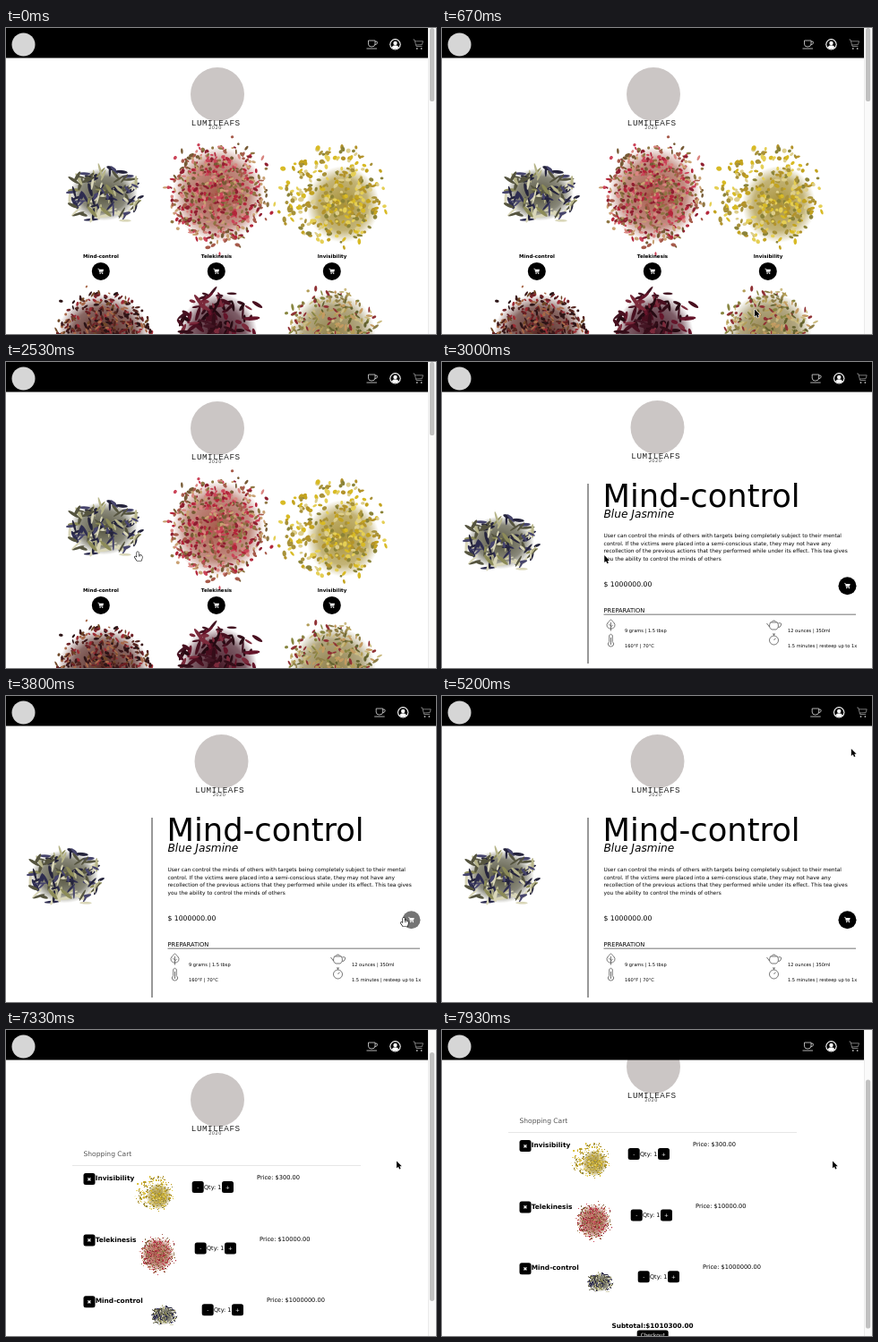
These frames come from a looping animation (480 px wide and 342 px high, 8 s). An HTML page with a canvas:

```html
<!DOCTYPE html>
<html lang="en">
<head>
<meta charset="utf-8">
<title>Tea shop</title>
<style>
html, body { margin: 0; width: 100%; height: 100%; overflow: hidden; background: #fff; }
canvas { display: block; width: 480px; height: 342px; }
</style>
</head>
<body>
<canvas id="stage"></canvas>
<script>
const W = 480, H = 342, LOOP = 8000, TAU = Math.PI * 2;
const SANS = '"DejaVu Sans", Verdana, sans-serif';
const MONO = '"Liberation Mono", "Courier New", monospace';
const stage = document.getElementById('stage');
const dpr = window.devicePixelRatio || 1;
stage.width = W * dpr;
stage.height = H * dpr;
const c = stage.getContext('2d');

// ---------- helpers ----------
function text(str, x, y, size, o = {}) {
  c.font = `${o.style || ''} ${size}px ${o.font || SANS}`;
  c.textAlign = o.align || 'left';
  c.fillStyle = o.color || '#000';
  c.fillText(str, x, y);
}

function box(x, y, w, h, color, r = 0) {
  c.fillStyle = color;
  c.beginPath();
  c.roundRect(x, y, w, h, r);
  c.fill();
}

function disc(x, y, r, color) {
  c.fillStyle = color;
  c.beginPath();
  c.arc(x, y, r, 0, TAU);
  c.fill();
}

function line(d, color, width = 0.8) {
  c.strokeStyle = color;
  c.lineWidth = width;
  c.stroke(new Path2D(d));
}

function at(x, y, draw) {
  c.save();
  c.translate(x, y);
  draw();
  c.restore();
}

function random(seed) {
  return () => {
    seed = (seed + 0x6D2B79F5) | 0;
    let n = Math.imul(seed ^ (seed >>> 15), 1 | seed);
    n ^= n + Math.imul(n ^ (n >>> 7), 61 | n);
    return ((n ^ (n >>> 14)) >>> 0) / 4294967296;
  };
}

// Each move is [begin, end, ...goal]; returns the eased place at time t
function glide(from, moves, t) {
  return moves.reduce((place, [begin, end, ...goal]) => {
    const p = Math.min(1, Math.max(0, (t - begin) / (end - begin)));
    const e = p * p * (3 - 2 * p);
    return place.map((v, i) => v + (goal[i] - v) * e);
  }, from);
}

// ---------- tea piles ----------
const SIZE = 150;

// The first colour is the shade between the leaves; lean shifts the dense core
function makePile(seed, { rx, ry, n, len, wid, lean = 0, colors }) {
  const cv = document.createElement('canvas');
  cv.width = cv.height = SIZE * 2;
  const g = cv.getContext('2d'), rnd = random(seed);
  g.scale(2, 2);
  g.translate(SIZE / 2, SIZE / 2);

  const glow = g.createRadialGradient(0, 0, 0, 0, 0, 1);
  glow.addColorStop(0, colors[0]);
  glow.addColorStop(0.65, colors[0] + 'b0');
  glow.addColorStop(0.95, colors[0] + '00');
  g.save();
  g.translate(lean, lean);
  g.scale(rx - lean, ry - lean);
  g.fillStyle = glow;
  g.fillRect(-1, -1, 2, 2);
  g.restore();

  for (let i = 0; i < n; i++) {
    const a = rnd() * TAU;
    const r = rnd() ** 0.6 * (rnd() < 0.1 ? 1.2 : 1);
    const core = lean * (1 - r);
    g.fillStyle = colors[Math.floor(rnd() * colors.length)];
    g.beginPath();
    g.ellipse(Math.cos(a) * r * rx + core, Math.sin(a) * r * ry + core,
      len * (0.5 + rnd() * 0.8), wid * (0.6 + rnd() * 0.7), rnd() * Math.PI, 0, TAU);
    g.fill();
  }
  return cv;
}

const blue = makePile(4, {
  rx: 40, ry: 31, n: 120, len: 6.5, wid: 1.6,
  colors: ['#55543f', '#2e2d50', '#b7b58a', '#8c8b58', '#d9d6b8', '#25243c', '#46446c']
});
const red = makePile(11, {
  rx: 54, ry: 56, n: 620, len: 2.5, wid: 1.5,
  colors: ['#a65a4a', '#b3263a', '#cb4358', '#8f7643', '#c9a173', '#8f1f30', '#d98580', '#765a35']
});
const gold = makePile(23, {
  rx: 54, ry: 56, n: 330, len: 2.7, wid: 2.1, lean: 11,
  colors: ['#a8923a', '#d8ba25', '#c3a31f', '#e5cf55', '#8b8338', '#b3932a', '#ddce8c']
});
const spice = makePile(31, {
  rx: 54, ry: 48, n: 520, len: 2.7, wid: 1.3,
  colors: ['#55251f', '#3a1719', '#6c2024', '#9c2b34', '#6f4727', '#2b1416', '#a8694a']
});
const berry = makePile(47, {
  rx: 46, ry: 49, n: 170, len: 7, wid: 1.9,
  colors: ['#431523', '#480f1f', '#641429', '#260a12', '#7b2a3b', '#340d18']
});
const herb = makePile(59, {
  rx: 50, ry: 50, n: 420, len: 3.1, wid: 1.3,
  colors: ['#8f7f48', '#87853f', '#b39d57', '#8f3034', '#cbbb82', '#63612f', '#c49b62']
});

function pile(img, x, y, scale = 1) {
  const s = SIZE * scale;
  c.drawImage(img, x - s / 2, y - s / 2, s, s);
}

// ---------- shared parts ----------
function cartButton(x, y, color = '#000') {
  disc(x, y, 10, color);
  at(x, y, () => {
    line('M-3.4 -2.8H-2.2L-1.2 1.2H2.4', '#fff', 0.7);
    c.fillStyle = '#fff';
    c.fill(new Path2D('M-2 -2.2H3.2L2.5 .5H-1.3Z'));
    for (const x of [-0.7, 1.9]) disc(x, 2.3, 0.7, '#fff');
  });
}

function header(width, shift = 0) {
  box(0, 0, width, 33.4, '#000');
  disc(19.5, 18.5, 13, '#d6d6d6');
  at(408 + shift, 18, () =>
    line('M-3.5 -4V0Q-3.5 3 0 3Q4 3 4 0V-4ZM4 -3Q7 -3.5 6.5 -1.2Q6 .6 3.8 .6M-5.5 5H6', '#ddd'));
  at(434.5 + shift, 18.3, () => {
    disc(0, 0, 6.2, '#fff');
    disc(0, 0, 5.1, '#000');
    disc(0, -1.4, 2.2, '#fff');
    c.fillStyle = '#fff';
    c.fill(new Path2D('M-4 3.4Q-3 1 0 1T4 3.4Q0 7 -4 3.4Z'));
  });
  at(460 + shift, 18, () => {
    line('M-5.5 -5H-4L-2 2.5H4.5M-3.6 -3.2H5.5L4.4 .6L-2.5 1', '#aaa', 0.7);
    for (const x of [-1.2, 3.7]) disc(x, 5, 0.9, '#aaa');
  });
}

function brand(x, y) {
  disc(x + 1, y + 74, 30, '#cbc6c5');
  c.letterSpacing = '0.5px';
  text('LUMILEAFS', x - 0.8, y + 109.3, 9.3, { align: 'center', font: MONO, color: '#222' });
  text('2020', x - 1.5, y + 113, 5, { align: 'center', color: '#444' });
  c.letterSpacing = '0px';
}

function scrollbar(top, height) {
  box(471, 0, 9, H, '#fafafa');
  box(471, 0, 0.8, H, '#e6e6e6');
  box(473, top, 5.2, height, '#c1c1c1', 2.6);
}

// ---------- pages ----------
const TEAS = ['Mind-control', 'Telekinesis', 'Invisibility'];

function home() {
  brand(235, 0);
  [blue, red, gold].forEach((img, i) => pile(img, 109 + i * 128, 186));
  [spice, berry, herb].forEach((img, i) => pile(img, 109 + i * 128, 343));
  TEAS.forEach((name, i) => {
    const x = 106 + i * 129;
    text(name, x, 257, 5.55, { style: 'bold', align: 'center' });
    cartButton(x - 0.2, 271.9);
  });
  header(471);
  scrollbar(0, 82);
}

const ABOUT = [
  'User can control the minds of others with targets being completely subject to their mental',
  'control. If the victims were placed into a semi-conscious state, they may not have any',
  'recollection of the previous actions that they performed while under its effect. This tea gives',
  'you the ability to control the minds of others'
];
const BREWING = [
  ['9 grams | 1.5 tbsp', 'M0 -6Q-8 0 -2 4H2Q8 0 0 -6ZM0 -3V6.5M0 2L2.3 0M0 1L-2.3 -1'],
  ['12 ounces | 350ml', 'M-4 -3H4Q6.5 3 2.5 5H-2.5Q-6.5 3 -4 -3ZM-3 -3Q0 -7 3 -3M-5 2L-8 -2M5 -2Q9 -3 8 0T5 2.5'],
  ['160°F | 70°C', 'M-1.8 -5.5Q0 -8 1.8 -5.5V1.5Q4.4 4 2.4 6.2Q0 8 -2.4 6.2Q-4.4 4 -1.8 1.5ZM0 -3V5'],
  ['1.5 minutes | resteep up to 1x', 'M5 0A5 5 0 1 1 -5 0A5 5 0 1 1 5 0M0 -5V-7M-1.6 -7H1.6M0 0L2 -2.4']
];

function product(hover) {
  brand(239.5, -1);
  pile(blue, 65, 202);
  box(162.5, 136, 1, 201, '#333');
  text('Mind-control', 179.5, 162.3, 35.3);
  text('Blue Jasmine', 180.5, 174, 12.2, { style: 'italic' });
  ABOUT.forEach((s, i) => text(s, 180.5, 196 + i * 8.5, 5.87));
  text('$ 1000000.00', 180.5, 251, 7.7);
  text('PREPARATION', 180.5, 280, 6.7);
  box(180.5, 281.7, 281.5, 0.9, '#444');
  cartButton(452.5, 250.2, hover ? '#757575' : '#000');
  BREWING.forEach(([label, icon], i) => {
    const x = 188.5 + (i % 2) * 182, y = 294 + Math.floor(i / 2) * 17;
    at(x, y, () => line(icon, '#555'));
    text(label, x + 15.5, y + 7.8, 5.1);
  });
  header(W, 8.7);
}

const ROWS = [
  { name: 'Invisibility', price: 300, dx: 0, img: gold },
  { name: 'Telekinesis', price: 10000, dx: 3, img: red },
  { name: 'Mind-control', price: 1000000, dx: 11, img: blue }
];

function button(label, x, y, w = 13, h = 13) {
  box(x, y, w, h, '#000', 2.5);
  text(label, x + w / 2, y + h / 2 + 2, 5.8, { align: 'center', color: '#fff' });
}

function cart(scroll) {
  at(0, -scroll, () => {
    brand(235, 34);
    text('Shopping Cart', 86.5, 171, 7.55, { color: '#555' });
    box(74, 181, 322, 0.8, '#dedede');
    ROWS.forEach(({ name, price, dx, img }, i) => at(0, i * 68.6, () => {
      button('✖', 86.5, 190);
      text(name, 99.7, 198.2, 7.4, { style: 'bold' });
      pile(img, 166.5 + dx * 0.9, 212, 0.345);
      button('-', 207.7 + dx, 199);
      text('Qty: 1', 221 + dx, 207.8, 6.5);
      button('+', 241 + dx, 199);
      text(`Price: $${price}.00`, 280 + dx, 197.2, 6.65);
    }));
    const total = ROWS.reduce((sum, row) => sum + row.price, 0);
    text(`Subtotal:$${total}.00`, 235, 399.5, 7.25, { style: 'bold', align: 'center' });
    button('Checkout', 217.7, 402.5, 35, 11);
  });
  header(471);
  scrollbar(scroll * 0.83, 278);
}

function statusBar() {
  c.globalAlpha = 0.88;
  box(0, 331, 158, 11, '#a3a3a3', [0, 3, 0, 0]);
  c.globalAlpha = 1;
  text('https://teacupshopsample.herokuapp.com/cart', 2, 339, 6.3, { color: '#e9e9e9' });
}

// ---------- pointer ----------
const ENTRY = [424, 348];
const MOVES = [
  [70, 1400, 249, 270],
  [1800, 2530, 147, 212],
  [2800, 3750, 444, 247.5],
  [4600, 5330, 458, 42],
  [5670, 5850, 465, 23.5],
  [6600, 7000, 436, 146.5]
];
const WHEEL = [[7000, 7320, 30], [7450, 7600, 46], [7750, 7930, 67]];
const ARROW = new Path2D('M0 0V8L1.9 6.3L3.1 9.1L4.6 8.4L3.4 5.8H5.8Z');
const HAND = new Path2D('M-.9 .8Q0 -.6 .9 .8V3.8Q4 3 5 5.6Q5 8 4 10H-.8Q-1.8 8.3 -3.1 6.6Q-3.6 5.2 -2.4 5.3L-.9 6.4Z');

const during = (t, from, to) => t > from && t < to;

function pointer(t) {
  const hand = during(t, 1950, 2740) || during(t, 3620, 4680) || during(t, 5700, 6640);
  const shape = hand ? HAND : ARROW;
  at(...glide(ENTRY, MOVES, t), () => {
    c.fillStyle = hand ? '#fff' : '#000';
    c.strokeStyle = hand ? '#000' : '#fff';
    c.lineWidth = 1.2;
    c.lineJoin = 'round';
    c.stroke(shape);
    c.fill(shape);
    if (hand) line('M1.2 4V5.5M2.6 4V5.5', '#000', 0.6);
  });
}

// ---------- loop ----------
const start = performance.now();

function draw(now) {
  const t = Math.max(0, now - start) % LOOP;
  c.setTransform(dpr, 0, 0, dpr, 0, 0);
  c.fillStyle = '#fff';
  c.fillRect(0, 0, W, H);
  if (t < 2740) home();
  else if (t < 5940) product(during(t, 3660, 4660));
  else cart(glide([0], WHEEL, t)[0]);
  if (during(t, 5760, 6660)) statusBar();
  pointer(t);
  requestAnimationFrame(draw);
}
requestAnimationFrame(draw);
</script>
</body>
</html>
```
